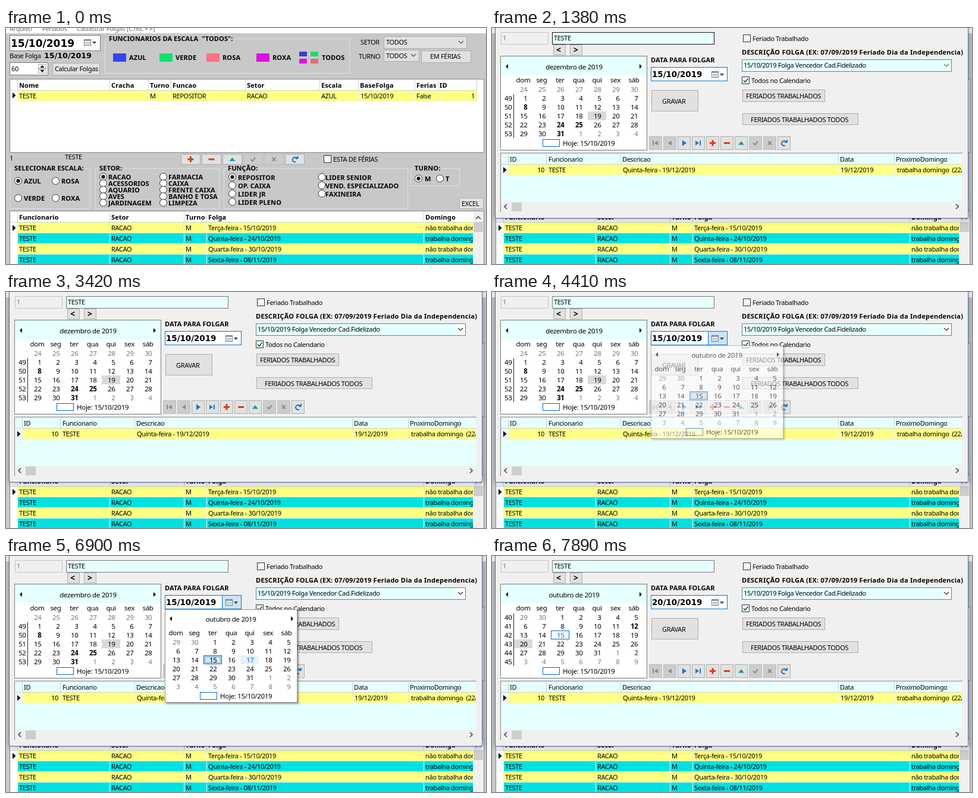
An HTML page that plays this animation: 807 px wide and 399 px high, repeating every 8 s.

```html
<!DOCTYPE html>
<html lang="pt">
<head>
<meta charset="utf-8">
<title>Escala de folgas</title>
<style>
html, body { margin: 0; width: 100%; height: 100%; overflow: hidden; background: #c8c8c8; }
svg { display: block; }
text { font: 11px "Noto Sans", "Open Sans", sans-serif; letter-spacing: -.33px; white-space: pre; }
.b { font-weight: 700; letter-spacing: .1px; }
.wide { letter-spacing: .25px; }
.step { font-size: 14px; }
.date { font: 700 17px "DejaVu Sans", sans-serif; letter-spacing: 0; }
.base { font-size: 12.7px; }
.pick { font-size: 13.4px; }
.cal { font-size: 11.5px; letter-spacing: -.3px; }
.cal.b { font-weight: 700; }
.dim { fill: #777; }
.blue { fill: #0066cc; }
.r { text-anchor: end; }
.m { text-anchor: middle; }
.hot > rect:first-child { fill: #e5f1fb; stroke: #0078d7; }
.edge > rect:first-child { stroke: #171717; }
#menu text { fill: #6d6d6d; }
#menu.on text { fill: #000; }
#desc .drop { fill: none; }
#desc.used .drop { fill: #fff; }
#desc.arrow .drop { fill: #cce4f7; stroke: #0078d7; }
#desc path { stroke: #666; }
#desc.used path { stroke: #222; }
</style>
</head>
<body>
<svg id="stage" width="807" height="399" viewBox="0 0 807 399"></svg>
<script>
// Drawing helpers; every one returns SVG markup.
const GRAY = '#adadad', FIELD = '#7a7a7a', AQUA = '#e6ffff', YELLOW = '#ffff80', CYAN = '#00e1e1';
const RULE = '#f0f0f0';
const fill = (x, y, x2, y2, c, more = '') =>
  `<rect x="${x}" y="${y}" width="${x2 - x}" height="${y2 - y}" fill="${c}" ${more}/>`;
const box = (x, y, x2, y2, c, line, more = '') =>
  fill(x + .5, y + .5, x2 - .5, y2 - .5, c, `stroke="${line}" ${more}`);
const text = (x, y, s, cls = '', more = '') =>
  `<text x="${x}" y="${y}" class="${cls}" ${more}>${String(s).replace(/</g, '&lt;')}</text>`;
const bold = (x, y, s) => text(x, y, s, 'b');
const path = (d, line, width = 1, paint = 'none') =>
  `<path d="${d}" fill="${paint}" stroke="${line}" stroke-width="${width}"/>`;
const solid = (d, c = '#000') => path(d, 'none', 0, c);
const group = (id, body, more = '') => `<g id="${id}" ${more}>${body}</g>`;
const clip = (id, x, y, x2, y2, body) =>
  `<clipPath id="${id}">${fill(x, y, x2, y2, '#000')}</clipPath><g clip-path="url(#${id})">${body}</g>`;
const lines = (xs, y, y2, c = '#d0d0d0') => xs.map(x => fill(x, y, x + 1, y2, c)).join('');
const chevron = (x, y) => path(`M${x - 4} ${y - 2}l4 4 4-4`, '#444', 1.1);
const marker = (x, y) => solid(`M${x} ${y - 5}l5.5 5-5.5 5z`);
const button = (x, y, x2, y2, tx, ty, s, cls) => box(x, y, x2, y2, '#e1e1e1', GRAY) + text(tx, ty, s, cls);
const check = (x, y, c, on) => box(x, y, x + 13, y + 13, c, '#333') +
  (on ? path(`M${x + 3} ${y + 6.5}l2.6 3 5-6`, '#222', 1.3) : '');
const radio = (x, y, s, tx, ty, on) =>
  `<circle cx="${x}" cy="${y}" r="6" fill="#fff" stroke="#333"/>` +
  (on ? `<circle cx="${x}" cy="${y}" r="3.2" fill="#222"/>` : '') + bold(tx, ty, s);
const frame = (x, y, x2, y2, s, tx, w) =>
  box(x, y, x2, y2, 'none', '#e0e0e0') + fill(tx - 2, y - 2, tx + w, y + 3, '#c8c8c8') + bold(tx, y + 4, s);
const dateIcon = (x, y) => box(x, y, x + 12, y + 11, '#fff', '#777') + fill(x + 1, y + 1, x + 11, y + 3, '#8aa0b8') +
  path(`M${x + 2} ${y + 5.5}h8M${x + 2} ${y + 8}h8`, '#888', 1.2) +
  solid(`M${x + 14} ${y + 4}h7l-3.5 4z`, '#345');

// Navigator buttons
const RED = '#dc3a14', BLUE = '#1478c8', OFF = '#8c8c8c';
const icons = {
  first: (x, y) => fill(x - 5, y - 4, x - 3, y + 4, OFF) + solid(`M${x + 4} ${y - 4}v8l-6-4z`, OFF),
  prior: (x, y) => solid(`M${x + 3} ${y - 4}v8l-6-4z`, OFF),
  next: (x, y) => solid(`M${x - 3} ${y - 5}v10l7-5z`, BLUE),
  last: (x, y) => solid(`M${x - 5} ${y - 4}v8l6-4z`, BLUE) + fill(x + 2, y - 4, x + 4, y + 4, BLUE),
  plus: (x, y) => path(`M${x - 5} ${y}h10M${x} ${y - 5}v10`, RED, 3),
  minus: (x, y) => path(`M${x - 5} ${y}h10`, RED, 3),
  edit: (x, y) => solid(`M${x - 5} ${y + 3}h10l-5-6z`, '#109aa4'),
  post: (x, y) => path(`M${x - 4} ${y}l3 3 5-6`, OFF, 2),
  cancel: (x, y) => path(`M${x - 3} ${y - 3}l6 6m0-6l-6 6`, OFF, 2),
  refresh: (x, y) => path(`M${x + 2} ${y + 4}a4 4 0 1 1 2-4`, BLUE, 2) + solid(`M${x} ${y - 1}h6v-5z`, BLUE)
};
const disabled = ['first', 'prior', 'post', 'cancel'];
const navigator = (x, y, w, h, names) => names.map((n, i) => {
  const left = x + i * (w + 2);
  const [face, line] = disabled.includes(n) ? ['#cccccc', '#bfbfbf'] : ['#e1e1e1', GRAY];
  return `<g class="nav-${n}">` + box(left, y, left + w, y + h, face, line) +
    icons[n](left + w / 2, y + h / 2) + '</g>';
}).join('');

// Month grids: six weeks of 31 x 15 cells
const WEEK = ['dom', 'seg', 'ter', 'qua', 'qui', 'sex', 'sáb'];
const cell = i => [i % 7 * 31, Math.floor(i / 7) * 15];
const weekdays = (x, y) => WEEK.map((d, i) => text(x + 15.5 + i * 31, y, d, 'cal m')).join('');
const days = (x, y, month, start, strong = []) => Array.from({ length: 42 }, (_, i) => {
  const d = new Date(2019, month, start + i), inside = d.getMonth() === month + 1;
  const [dx, dy] = cell(i);
  return text(x + dx + 22.5, y + dy + 12, d.getDate(),
    'cal r' + (inside ? '' : ' dim') + (strong.includes(i) ? ' b' : ''));
}).join('');
const weeks = (from, to, row) => Array.from({ length: to - from + 1 }, (_, i) =>
  text(33.5, 108 + (row + i) * 15, from + i, 'cal r')).join('') +
  fill(36, 97 + row * 15, 37, 186, '#222');
const arrows = (x, x2, y) => solid(`M${x + 2} ${y - 4}v8l-4-4z`) + solid(`M${x2 - 2} ${y - 4}v8l4-4z`);
const today = (x, y) => box(x, y, x + 29, y + 13, '#fff', '#0066cc') + text(x + 34, y + 11, 'Hoje: 15/10/2019', 'cal');

function mainWindow() {
  const swatch = (x, c, s) => fill(x, 43, x + 22, 57, c) + bold(x + 27, 54, s);
  const heads = (y, list) => list.map(([x, s]) => bold(x, y, s)).join('');
  const cells = (y, list) => list.map(([x, s]) => text(x, y, s)).join('');
  const choices = (x, tx, y, gap, names, on) =>
    names.map((s, i) => radio(x, y + i * gap, s, tx, y + i * gap + 4.5, i === on)).join('');
  const cols = [19, 174, 239, 277, 402, 527, 592, 687, 726, 791];
  const cols2 = [19, 174, 299, 337, 702];
  const rows = [['Terça-feira - 15/10/2019', 'não trabalha domingo'], ['Quinta-feira - 24/10/2019', 'trabalha domingo'],
    ['Quarta-feira - 30/10/2019', 'não trabalha domingo'], ['Sexta-feira - 08/11/2019', 'trabalha domingo']];
  return fill(0, 0, 807, 399, '#c8c8c8') + fill(0, 0, 807, 9, '#fff') +
    group('menu', group('folgas', box(112, -12, 272, 10, 'none', 'none')) +
      text(6, 5, 'Arquivo') + text(61, 5, 'Feriados') + text(119, 5, 'Cadastrar Folgas [CTRL + F]')) +
    box(6, 12, 159, 39, '#fff', FIELD) + text(8, 32, '15/10/2019', 'date') + dateIcon(131, 19) +
    text(6, 51, 'Base Folga') + text(64, 51, '15/10/2019', 'date base') +
    group('spin', box(6, 58, 71, 80, '#fff', FIELD) + fill(8, 61, 22, 76, 'none', 'id="sel"') + text(9, 73, '60', '', 'id="sixty"') +
      box(54, 61, 68, 69, '#f0f0f0', GRAY) + box(54, 69, 68, 77, '#f0f0f0', GRAY) +
      solid('M57.5 67h7l-3.5-4z') + solid('M57.5 71h7l-3.5 4z')) +
    button(78, 59, 158, 80, 82, 73, 'Calcular Folgas') +
    frame(166, 18, 578, 77, 'FUNCIONARIOS DA ESCALA  "TODOS":', 173, 211) +
    swatch(180, '#3246f0', 'AZUL') + swatch(258, '#10e070', 'VERDE') + swatch(337, '#ff7080', 'ROSA') + swatch(421, '#dc10e0', 'ROXA') +
    fill(493, 40, 506, 48, '#3c3cc8') + fill(512, 40, 525, 48, '#10e070') +
    fill(493, 52, 506, 60, '#dc10e0') + fill(512, 52, 525, 60, '#dc7078') + bold(531, 54, 'TODOS') +
    text(596, 28, 'SETOR') + group('setor', box(635, 14, 775, 35, '#e1e1e1', GRAY) + text(639, 28, 'TODOS') + chevron(765, 24)) +
    text(593, 52, 'TURNO') + box(635, 37, 695, 57, '#e1e1e1', GRAY) + text(639, 51, 'TODOS') + chevron(685, 46) +
    button(698, 38, 782, 59, 713, 52, 'EM FÉRIAS') +
    box(6, 86, 804, 211, '#fff', '#828790') + lines(cols, 87, 106) +
    heads(101, [[22, 'Nome'], [177, 'Cracha'], [242, 'Turno'], [280, 'Funcao'], [405, 'Setor'], [530, 'Escala'],
      [595, 'BaseFolga'], [690, 'Ferias'], [729, 'ID']]) +
    fill(7, 105, 792, 106, '#d0d0d0') + fill(20, 106, 791, 123, YELLOW) + lines(cols, 106, 124, RULE) + fill(7, 123, 792, 124, RULE) +
    marker(11, 114) + cells(119, [[22, 'TESTE'], [242, 'M'], [280, 'REPOSITOR'], [405, 'RACAO'], [530, 'AZUL'],
      [596, '15/10/2019'], [690, 'False']]) + text(788, 119, '1', 'r') +
    text(6, 224, '1') + text(99, 222, 'TESTE') +
    navigator(294, 213, 33, 18, ['plus', 'minus', 'edit', 'post', 'cancel', 'refresh']) +
    check(534, 215, '#fff') + text(550, 226, 'ESTA DE FÉRIAS') +
    frame(6, 237, 142, 306, 'SELECIONAR ESCALA:', 14, 118) +
    choices(20.5, 30, 258.5, 29, ['AZUL', 'VERDE'], 0) + choices(83.5, 93, 258.5, 29, ['ROSA', 'ROXA']) +
    frame(150, 237, 359, 306, 'SETOR:', 157, 42) +
    choices(163.5, 172, 251.5, 11, ['RACAO', 'ACESSORIOS', 'AQUARIO', 'AVES', 'JARDINAGEM'], 0) +
    choices(264.5, 273, 251.5, 11, ['FARMACIA', 'CAIXA', 'FRENTE CAIXA', 'BANHO E TOSA', 'LIMPEZA']) +
    frame(366, 237, 676, 306, 'FUNÇÃO:', 373, 52) +
    choices(380.5, 390, 252, 14, ['REPOSITOR', 'OP. CAIXA', 'LIDER JR', 'LIDER PLENO'], 0) +
    choices(531, 537, 252, 14, ['LIDER SENIOR', 'VEND. ESPECIALIZADO', 'FAXINEIRA']) +
    frame(680, 237, 763, 267, 'TURNO:', 687, 45) + choices(693.5, 704, 254.5, 0, ['M'], 0) + choices(729.5, 739, 254.5, 0, ['T']) +
    button(762, 287, 803, 306, 766, 301, 'EXCEL') +
    box(6, 309, 804, 420, '#fff', '#828790') + lines(cols2, 310, 329) +
    heads(324, [[22, 'Funcionario'], [177, 'Setor'], [302, 'Turno'], [340, 'Folga'], [705, 'Domingo']]) +
    clip('rows', 7, 328, 785, 399, fill(7, 328, 785, 329, '#d0d0d0') + rows.map(([day, sunday], i) => {
      const y = 329 + i * 18;
      return fill(20, y, 785, y + 17, i % 2 ? CYAN : YELLOW) + fill(7, y + 17, 785, y + 18, RULE) +
        cells(y + 13, [[22, 'TESTE'], [177, 'RACAO'], [302, 'M'], [340, day], [705, sunday]]);
    }).join('') + lines(cols2, 329, 399, RULE)) + marker(11, 338) +
    fill(786, 310, 803, 399, '#f0f0f0') + path('M790 323l4-4 4 4', '#444', 1.6) + fill(786, 328, 802, 345, '#cdcdcd');
}

function dialog() {
  const cols = [27, 91, 216, 582, 676];
  const cells = (y, list) => list.map(([x, s]) => text(x, y, s)).join('');
  return box(5, -20, 801, 322, '#f0f0f0', '#4a6fb5', 'filter="url(#glow)"') +
    box(15, 7, 95, 28, '#f0f0f0', '#c4c4c4') + text(18, 21, '1', 'dim') +
    group('name', box(101, 7, 374, 28, AQUA, FIELD) + text(104, 21, 'TESTE')) +
    button(103, 28, 124, 46, 108, 42, '<', 'b step') + button(131, 28, 152, 46, 137, 42, '>', 'b step') +
    box(14, 47, 261, 207, '#fff', FIELD) + fill(15, 48, 260, 80, AQUA) +
    arrows(25, 250, 65) + text(138, 70, '', 'cal m', 'id="month"') +
    weekdays(37, 92) + clip('weeks', 18, 96, 257, 187,
      group('dec', fill(161, 141, 192, 156, '#d9d9d9') + weeks(49, 53, 1) + days(37, 95.5, 10, 24, [14, 30, 31, 37])) +
      group('oct', fill(37, 141, 68, 156, '#d9d9d9') + box(99, 126, 130, 141, '#fff', '#0066cc') + weeks(40, 45, 0) +
        days(37, 95.5, 8, 29, [13, 34]))) +
    today(85, 188) +
    bold(267, 58, 'DATA PARA FOLGAR') +
    group('date', box(267, 66, 396, 90, '#fff', '#0078d7') + box(363, 66, 396, 90, 'none', 'none', 'id="drop"') +
      text(269, 83, '', 'date pick', 'id="chosen"') + dateIcon(369, 73)) +
    button(268, 105, 347, 141, 286, 128, 'GRAVAR') +
    check(422, 11, AQUA) + text(438, 22, 'Feriado Trabalhado') +
    text(420, 45, 'DESCRIÇÃO FOLGA (EX: 07/09/2019 Feriado Dia da Independencia)', 'b wide') +
    group('desc', box(420, 53, 773, 74, AQUA, FIELD) + box(757, 54, 772, 73, 'none', 'none', 'class="drop"') +
      text(423, 67, '15/10/2019 Folga Vencedor Cad.Fidelizado') + chevron(764, 63)) +
    check(420, 82, AQUA, true) + text(436, 93, 'Todos no Calendario') +
    button(421, 104, 560, 125, 427, 119, 'FERIADOS TRABALHADOS') +
    button(421, 144, 616, 164, 435, 159, 'FERIADOS TRABALHADOS TODOS') +
    navigator(264, 183, 22, 23, Object.keys(icons)) +
    fill(14, 211, 791, 311, AQUA) + path('M14.5 311V211.5H791', '#828790') + path('M790.5 212V310.5H15', RULE) +
    lines(cols, 213, 230) +
    cells(226, [[30, 'ID'], [95, 'Funcionario'], [219, 'Descricao'], [585, 'Data'], [679, 'ProximoDomingo']]) +
    fill(15, 230, 790, 231, '#d0d0d0') + fill(28, 231, 790, 248, YELLOW) + lines(cols, 231, 249, RULE) + fill(15, 248, 790, 249, RULE) +
    marker(19, 240) + text(88, 244, '10', 'r') +
    clip('row', 15, 231, 790, 249, cells(244, [[95, 'TESTE'], [220, 'Quinta-feira - 19/12/2019'],
      [586, '19/12/2019'], [681, 'trabalha domingo  (22/12/2019)']])) +
    fill(15, 294, 790, 310, '#f0f0f0') + fill(33, 295, 50, 310, '#cdcdcd') +
    path('M25 298l-4 4 4 4M780 298l4 4-4 4', '#444', 1.6);
}

const popup = () => box(267, 90, 490, 248, '#fff', '#999', 'filter="url(#soft)"') + arrows(277, 481, 106) +
  text(378, 111, 'outubro de 2019', 'cal m', 'id="title"') + weekdays(270, 134) +
  fill(0, 0, 31, 15, '#e5f3ff', 'id="hover"') + box(332, 168, 363, 183, '#cce8ff', '#0066cc') +
  fill(334.5, 170.5, 360.5, 180.5, 'none', 'stroke="#456" stroke-dasharray="1"') +
  group('days', days(270, 137.5, 8, 29)) + today(326, 230);

const shadow = (id, d, blur, a) => `<filter id="${id}" x="-10%" y="-10%" width="120%" height="125%">` +
  `<feDropShadow dx="${d}" dy="${d}" stdDeviation="${blur}" flood-opacity="${a}"/></filter>`;
const $ = id => document.getElementById(id);
$('stage').innerHTML = shadow('glow', 1, 6, .35) + shadow('soft', 2, 1.5, .4) +
  mainWindow() + group('dialog', dialog() + group('popup', popup()));

// Timelines: [time, value], each value holds until the next
const LOOP = 8000;
const at = (list, t) => list.reduce((v, [time, next]) => t >= time ? next : v, list[0][1]);
const blink = (...times) => t => times.filter(x => t >= x).length % 2 === 1;
const setorHot = blink(150, 450, 720, 780);
const nameHot = blink(1380, 1860, 1950, 2100);
const descHot = blink(2250, 2430, 2820, 2910, 3060, 3330, 3600, 3660, 4050, 4110);
const arrowHot = blink(2310, 2370, 2640, 2820, 3600, 3660);
const minusHot = blink(7350, 7890);
const dialogAlpha = [[0, 0], [1260, .35], [1320, .8], [1380, 1]];
const popupAlpha = [[0, 0], [4350, .3], [4410, .6], [4470, .85], [4590, 1], [7350, 0]];
const hovers = [[0, -1], [4950, 'title'], [4980, 9], [5010, 16], [5040, 24], [5070, 31], [5130, 39], [5310, 31], [5640, 30],
  [5790, -1], [5820, 29], [6240, 23], [6270, 17], [6300, 18], [6450, 19], [6630, 20], [6900, 18], [6930, 17],
  [6960, 16], [6990, 22], [7050, 21]];

const dayTexts = [...$('days').children];
const minus = $('dialog').querySelector('.nav-minus');
$('oct').querySelectorAll('text.cal')[6 + 16].classList.add('blue');
const toggle = (el, cls, on) => el.classList.toggle(cls, on);
const show = (el, alpha) => {
  el.style.opacity = alpha;
  el.style.display = alpha ? '' : 'none';
};

function draw(t) {
  const focus = t >= 840, picked = t >= 7350;
  toggle($('setor'), 'hot', setorHot(t));
  toggle($('menu'), 'on', t >= 900);
  toggle($('folgas'), 'hot', t >= 1050 && t < 1260);
  $('spin').firstChild.style.stroke = focus ? '#0078d7' : '';
  $('sel').style.fill = focus ? '#0078d7' : '';
  $('sixty').style.fill = focus ? '#fff' : '';

  show($('dialog'), at(dialogAlpha, t));
  toggle($('name'), 'edge', nameHot(t));
  toggle($('desc'), 'edge', descHot(t));
  toggle($('desc'), 'arrow', arrowHot(t));
  toggle($('desc'), 'used', t >= 3330);
  toggle(minus, 'hot', minusHot(t));

  const open = t >= 4290 && !picked;
  $('drop').style.fill = open ? '#cce4f7' : '';
  $('drop').style.stroke = open ? '#0078d7' : '';
  show($('popup'), at(popupAlpha, t));
  const over = at(hovers, t);
  toggle($('title'), 'blue', over === 'title');
  dayTexts.forEach((el, i) => toggle(el, 'blue', i === over));
  const [x, y] = over >= 0 ? cell(over) : [-999, 0];
  $('hover').setAttribute('transform', `translate(${270 + x} ${138 + y})`);

  $('chosen').textContent = picked ? '20/10/2019' : '15/10/2019';
  $('month').textContent = picked ? 'outubro de 2019' : 'dezembro de 2019';
  const p = Math.min(1, Math.max(0, Math.floor((t - 7350) / 30) / 12));
  const slide = Math.round(240 * (1 - (1 - p) ** 2));
  $('dec').setAttribute('transform', `translate(${slide} 0)`);
  $('oct').setAttribute('transform', `translate(${slide - 240} 0)`);
}

const start = performance.now();
function tick() {
  draw((performance.now() - start) % LOOP);
  requestAnimationFrame(tick);
}
tick();
</script>
</body>
</html>
```
